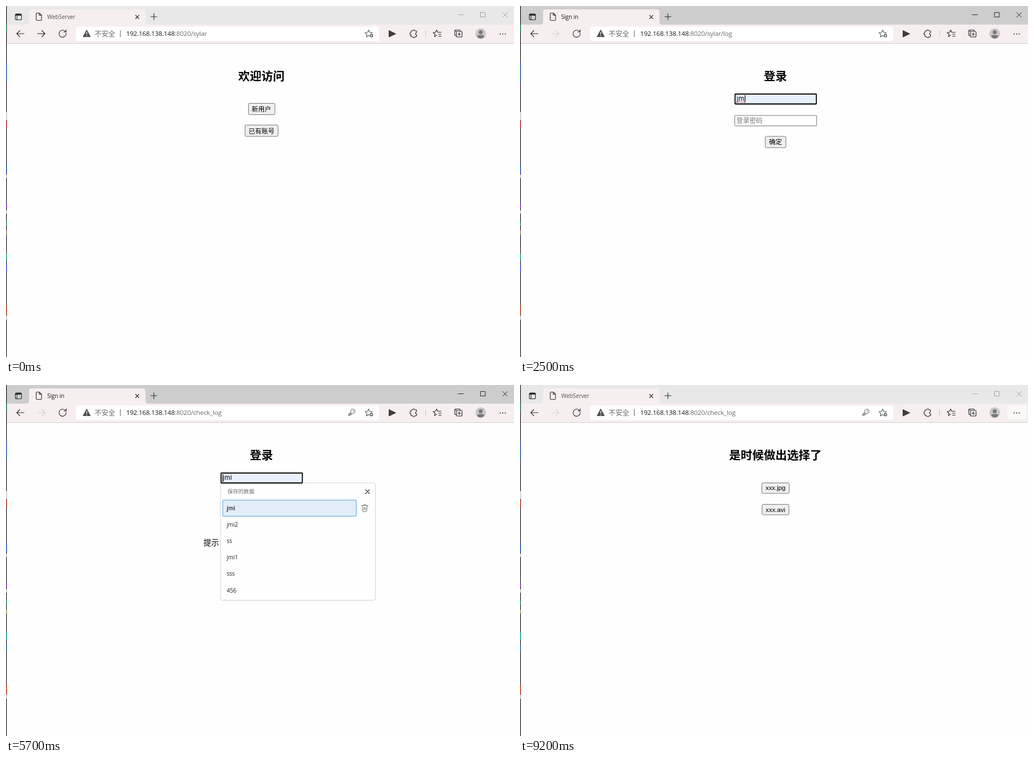
These frames come from a looping animation (900x622 px, 9300 ms). An HTML page:

```html
<!DOCTYPE html>
<html lang="zh-CN">
<head>
<meta charset="utf-8">
<title>WebServer</title>
<style>
html, body { margin: 0; width: 100%; height: 100%; overflow: hidden; background: #fefefe; }
svg { display: block; width: 900px; height: 622px; }
text { font-family: "Open Sans", "Noto Sans", sans-serif; white-space: pre; }
.cjk, .cjk text { font-family: "Noto Sans CJK SC", "Noto Sans CJK", sans-serif; }
.arial { font: 11.4px "Liberation Sans", sans-serif; }
.mid { text-anchor: middle; }
.head { font-size: 20.5px; font-weight: 700; text-anchor: middle; }
.ui { font-size: 11.5px; }
.hint { fill: #757575; }
.tab { font-size: 10px; letter-spacing: -.1px; }
.url { font-size: 11.6px; letter-spacing: -.2px; fill: #6c6a6b; }
.url tspan { fill: #1c1c1c; }
.line { fill: none; stroke: #2a2a2a; stroke-width: 1.1; stroke-linecap: round; stroke-linejoin: round; }
.btn { fill: #efefef; stroke: #767676; }
.over { fill: #e2e2e2; stroke: #4f4f4f; }
.box { fill: #fff; stroke: #767676; }
.ring { fill: none; stroke: #101010; stroke-width: 1.8; }
.caret { stroke: #111; stroke-width: 1; }
.menu text { font-size: 10px; fill: #1f1f1f; }
</style>
</head>
<body>
<svg viewBox="0 0 900 622">
  <rect width="900" height="622" fill="#fefefe"/>

  <!-- title bar -->
  <rect width="900" height="33" fill="#e8e8e8"/>
  <path class="line" style="stroke:#a3a3a3;stroke-width:1" d="M801.5 15.5h9M841 11.5h8v8h-8zM880 11.500l8.500 8.500m0-8.500l-8.500 8.500"/>
  <g data-at="0:0 900:.5 1000:1 9000:.66 9100:.33 9200:0">
    <rect width="900" height="33" fill="#cdcdcd"/>
    <path class="line" style="stroke-width:1" d="M801.5 15.500h9M841 11.500h8v8h-8zM880 11.500l8.500 8.500m0-8.500l-8.500 8.500"/>
  </g>
  <path fill="#f7eeef" d="M36 33q5 0 5-5V10q0-4 4-4h198q4 0 4 4v18q0 5 5 5z"/>
  <rect y="33" width="900" height="33" fill="#f7eeef"/>
  <path d="M0 66.500h900" stroke="#d3cfd0"/>
  <rect class="line" x="16.500" y="14" width="11" height="10.500" rx="2"/>
  <path d="M16.500 17v-1q0-2 2-2h7q2 0 2 2v1z" fill="#2a2a2a"/>
  <path class="line" d="M19.500 17v7"/>
  <path class="line" d="M53.500 14q0-1.500 1.500-1.500h4l4 4V24q0 1.500-1.500 1.500H55q-1.500 0-1.500-1.500zM59 12.500v4h4"/>
  <path class="line" d="M229.500 16.500l6 6m0-6l-6 6M256.500 19h11M262 13.500v11"/>
  <text class="tab" x="73" y="22.500" fill="#555" data-at="0:1 1000:0 7800:1">WebServer</text>
  <text class="tab" x="73" y="22.500" fill="#161616" data-at="0:0 1000:1 7800:0">Sign in</text>

  <!-- toolbar -->
  <path class="line" d="M32 49H19m5.500-5.500L19 49l5.500 5.500"/>
  <path class="line" style="stroke:#d6cecf" d="M56 49h13m-5.500-5.500L69 49l-5.500 5.500"/>
  <path class="line" data-at="0:1 1000:0" d="M56 49h13m-5.500-5.500L69 49l-5.500 5.500"/>
  <path class="line" d="M106.500 48a6.300 6.300 0 1 1-2-3.600l1.500 1.300M106.500 42v4h-4"/>
  <rect x="124" y="36.500" width="537" height="25.500" rx="4" fill="#fff"/>
  <path d="M143 42.500l6.500 12h-13z" fill="#505050" stroke="#505050" stroke-linejoin="round"/>
  <path d="M143 46v4.500m0 1.500v1.400" stroke="#fff" stroke-width="1.300"/>
  <text class="cjk" x="157" y="53.500" font-size="12.200" fill="#686868">不安全</text>
  <path d="M202.500 43v12" stroke="#666"/>
  <text class="url" x="213" y="53" data-at="0:1 1000:0"><tspan>192.168.138.148</tspan>:8020/sylar</text>
  <text class="url" x="213" y="53" data-at="0:0 1000:1 4600:0"><tspan>192.168.138.148</tspan>:8020/sylar/log</text>
  <text class="url" x="213" y="53" data-at="0:0 4600:1"><tspan>192.168.138.148</tspan>:8020/check_log</text>
  <g class="line" style="stroke:#777" data-at="0:0 3900:1 6000:0 6800:1">
    <path d="M612 49.500l-5 5v-2.500l4-4.200a3.800 3.800 0 1 1 3 2.500l-1.500 1.500h-1.500v1.500H609"/>
    <circle cx="615.500" cy="46" r=".5"/>
  </g>
  <g class="line" style="stroke:#555">
    <path id="star" d="M642.500 42.500l1.900 4.200 4.600.5-3.400 3.100.9 4.500-4-2.300-4 2.300.9-4.500-3.400-3.100 4.600-.5z"/>
    <circle cx="647.500" cy="52.500" r="3.300" fill="#555" stroke="#fff" stroke-width=".6"/>
    <path d="M646 52.500h3m-1.500-1.500v3" stroke="#fff" stroke-width=".9"/>
  </g>
  <path d="M678.500 43.500v11.500l12-5.700z" fill="#3d3d3d" stroke="#3d3d3d" stroke-linejoin="round"/>
  <path class="line" d="M718.500 44h2.200a1.800 1.800 0 0 1 3.600 0h2.200q1 0 1 1v2a2 2 0 0 0 0 4v2.500q0 1-1 1h-2.200a1.800 1.800 0 0 1-3.600 0h-2.200q-1 0-1-1V51a2 2 0 0 1 0-4v-2q0-1 1-1z"/>
  <path d="M743.500 43v12" stroke="#c8c0c1"/>
  <path class="line" d="M763 51.800l-3.800 2.500.9-4.300-3.300-3 4.400-.5 1.800-4 1.800 4h6M766 50h5m-4.500 3.500h4.500"/>
  <path class="line" d="M798 44.500h-1.500q-1.500 0-1.500-1.500m3 9.500h-1q-2 0-2-2V44.500q0-2 2-2h6q2 0 2 2"/>
  <rect class="line" x="798" y="45" width="10" height="10" rx="2" fill="#f7eeef"/>
  <path class="line" d="M800.500 50h5m-2.500-2.500v5"/>
  <circle cx="841" cy="49" r="9.500" fill="#cac8c8"/>
  <circle cx="841" cy="46.500" r="3.500" fill="#777"/>
  <path d="M835 54.500q0-3 3-3h6q3 0 3 3-2.500 3-6 3t-6-3z" fill="#777"/>
  <rect x="863" y="36" width="34" height="25" rx="3" fill="#fcf8f8" data-at="0:0 8700:.5 8800:1"/>
  <path d="M875.500 49.500h0m4.500 0h0m4.500 0h0" stroke="#2a2a2a" stroke-width="2" stroke-linecap="round"/>

  <!-- welcome page -->
  <g class="cjk" data-at="0:1 1000:0">
    <text class="head" x="452.500" y="131.500">欢迎访问</text>
    <rect class="btn" x="429.500" y="172.500" width="47" height="20" rx="2"/>
    <text class="ui mid" x="452.500" y="187">新用户</text>
    <rect class="btn" x="423.500" y="211" width="58.500" height="20" rx="2"/>
    <rect class="over" x="423.500" y="211" width="58.500" height="20" rx="2" data-at="0:0 500:1 1000:0"/>
    <text class="ui mid" x="452.700" y="225.500">已有账号</text>
  </g>

  <!-- login page -->
  <g class="cjk" data-at="0:0 1000:1 7800:0">
    <text class="head" x="452.500" y="131.500">登录</text>

    <rect class="box" x="380.500" y="194" width="145" height="18.500" rx="1"/>
    <rect class="ring" x="381" y="194.500" width="144" height="17.500" rx="1" data-at="0:0 2700:1 5000:0 6400:1 7800:0"/>
    <text class="ui hint" x="383.500" y="207" data-at="0:1 3900:0 5000:1 6800:0">登录密码</text>
    <g data-at="0:0 3900:1 5000:0 6800:1 7800:0">
      <circle cx="385.700" cy="202.500" r="1.500"/>
      <circle cx="389.500" cy="202.500" r="1.500" data-at="0:0 4000:1 5000:0 7000:1"/>
      <circle cx="393.300" cy="202.500" r="1.500" data-at="0:0 7200:1"/>
      <path class="line" d="M505.500 204.500q1.500-5.500 7-5.500t7 5.500"/>
      <circle class="line" cx="512.500" cy="205" r="2.700"/>
    </g>
    <path class="caret" d="M384.500 196v14" data-at="0:0 2700:1 3200:0 3600:1 3900:0 6400:1 6800:0"/>
    <path class="caret" d="M387.500 196v14" data-at="0:0 3900:1 4000:0 6800:1 7000:0"/>
    <path class="caret" d="M391.500 196v14" data-at="0:0 4000:1 5000:0 7000:1 7200:0"/>
    <path class="caret" d="M395.500 196v14" data-at="0:0 7200:1"/>

    <rect class="btn" x="434.500" y="231" width="36.500" height="20" rx="2"/>
    <rect class="over" x="434.500" y="231" width="36.500" height="20" rx="2" data-at="0:0 4300:1 4700:0 7500:1"/>
    <text class="ui mid" x="452.700" y="245.300">确定</text>
    <text x="350" y="284" font-size="13.670" data-at="0:0 4700:1">提示：用户名或密码错误，请重试</text>

    <g class="menu" data-at="0:0 1500:1 2300:.66 2400:.33 2500:0 5300:1 6000:.66 6100:.33 6200:0">
      <rect x="380" y="173.500" width="274.500" height="208" rx="4" fill="#fefefe" stroke="#d2d2d2"/>
      <text x="392.500" y="192.300" style="font-size:9.500px;fill:#6e6e6e">保存的数据</text>
      <path class="line" d="M637 185.500l7 7m0-7l-7 7"/>
      <g id="items"></g>
      <g data-at="0:0 1900:1 2500:0 5700:1 6200:0">
        <rect x="384" y="204" width="236.500" height="28.500" rx="1" fill="#e1eefa" stroke="#5d9fd0"/>
        <text x="391" y="222" style="font-family:'Open Sans',sans-serif;font-weight:600">jmi</text>
        <path class="line" style="stroke:#777" d="M629.500 213.500h12m-8 0q0-2 2-2t2 2m-6.500 0l1 9.500q.2 1.500 1.500 1.500h4q1.300 0 1.500-1.500l1-9.500M634.300 216.500v5m2.500-5v5"/>
      </g>
    </g>

    <rect class="box" x="380.500" y="155.500" width="145" height="18.500" rx="1"/>
    <text class="ui hint" x="383.500" y="168.800" data-at="0:1 1900:0 5000:1 5700:0">用户名</text>
    <g data-at="0:0 1900:1 5000:0 5700:1">
      <rect x="380.500" y="155.500" width="145" height="18.500" rx="1" fill="#e8f0fe" stroke="#767676"/>
      <text class="arial" x="383.500" y="168.300">jmi</text>
    </g>
    <path class="line" style="stroke:#e33;stroke-width:.8" d="M384 170.500l1.500-1 1.500 1 1.500-1 1.500 1 1.500-1 1.500 1 1.500-1 1.500 1 1.500-1" data-at="0:0 2300:1 2700:0"/>
    <rect class="ring" x="381" y="156" width="144" height="17.500" rx="1" data-at="0:0 1500:1 2700:0 5300:1 6200:0"/>
    <path class="caret" d="M384 158v13.500" data-at="0:0 1500:1 2300:0 5300:1 6000:0"/>
    <path class="caret" d="M398.500 158v13.500" data-at="0:0 2300:1 2700:0 6000:1 6200:0"/>
  </g>

  <!-- choice page -->
  <g data-at="0:0 7800:1">
    <text class="head cjk" x="452.500" y="131.500">是时候做出选择了</text>
    <rect class="btn" x="428.500" y="173.500" width="48.500" height="18.500" rx="2"/>
    <text class="arial mid" x="452.700" y="186.300">xxx.jpg</text>
    <rect class="btn" x="429" y="211.500" width="47.500" height="18.500" rx="2"/>
    <text class="arial mid" x="452.700" y="224.500">xxx.avi</text>
  </g>

  <!-- sliver of the desktop behind the window -->
  <rect width="1.300" height="622" fill="#25252b"/>
  <g id="sliver"></g>
</svg>
<script>
const LOOP = 9300;
const NS = "http://www.w3.org/2000/svg";

function add(parent, tag, attrs, text = "") {
  const el = document.createElementNS(NS, tag);
  for (const key in attrs) el.setAttribute(key, attrs[key]);
  el.textContent = text;
  document.getElementById(parent).append(el);
}

["jmi", "jmi2", "ss", "jmi1", "sss", "456"].forEach((name, i) =>
  add("items", "text", { x: 391, y: 222 + 29.1 * i, style: "font-family:'Open Sans',sans-serif" }, name));

// top, height, colour
[[30, 16, "#1d7a4c"], [100, 35, "#2a5ca8"], [188, 14, "#e4e4e4"], [204, 13, "#d22"],
 [280, 17, "#1d4fb8"], [299, 6, "#e0e0e0"], [350, 8, "#8a2be2"], [362, 6, "#ddd"],
 [382, 7, "#1fa36b"], [398, 7, "#b89a6a"], [438, 13, "#16b39a"], [460, 11, "#2a62d8"],
 [530, 18, "#c23b1a"], [549, 7, "#ddd"]]
  .forEach(([y, height, fill]) => add("sliver", "rect", { y, width: 1.3, height, fill }));

// Each data-at holds "time:opacity" steps
const parts = [...document.querySelectorAll("[data-at]")].map(el => ({
  el, steps: el.dataset.at.split(" ").map(step => step.split(":").map(Number))
}));
const start = performance.now();

function draw() {
  const t = (performance.now() - start) % LOOP;
  for (const { el, steps } of parts) {
    el.style.opacity = steps.findLast(([time]) => time <= t)[1];
  }
  requestAnimationFrame(draw);
}
draw();
</script>
</body>
</html>
```
